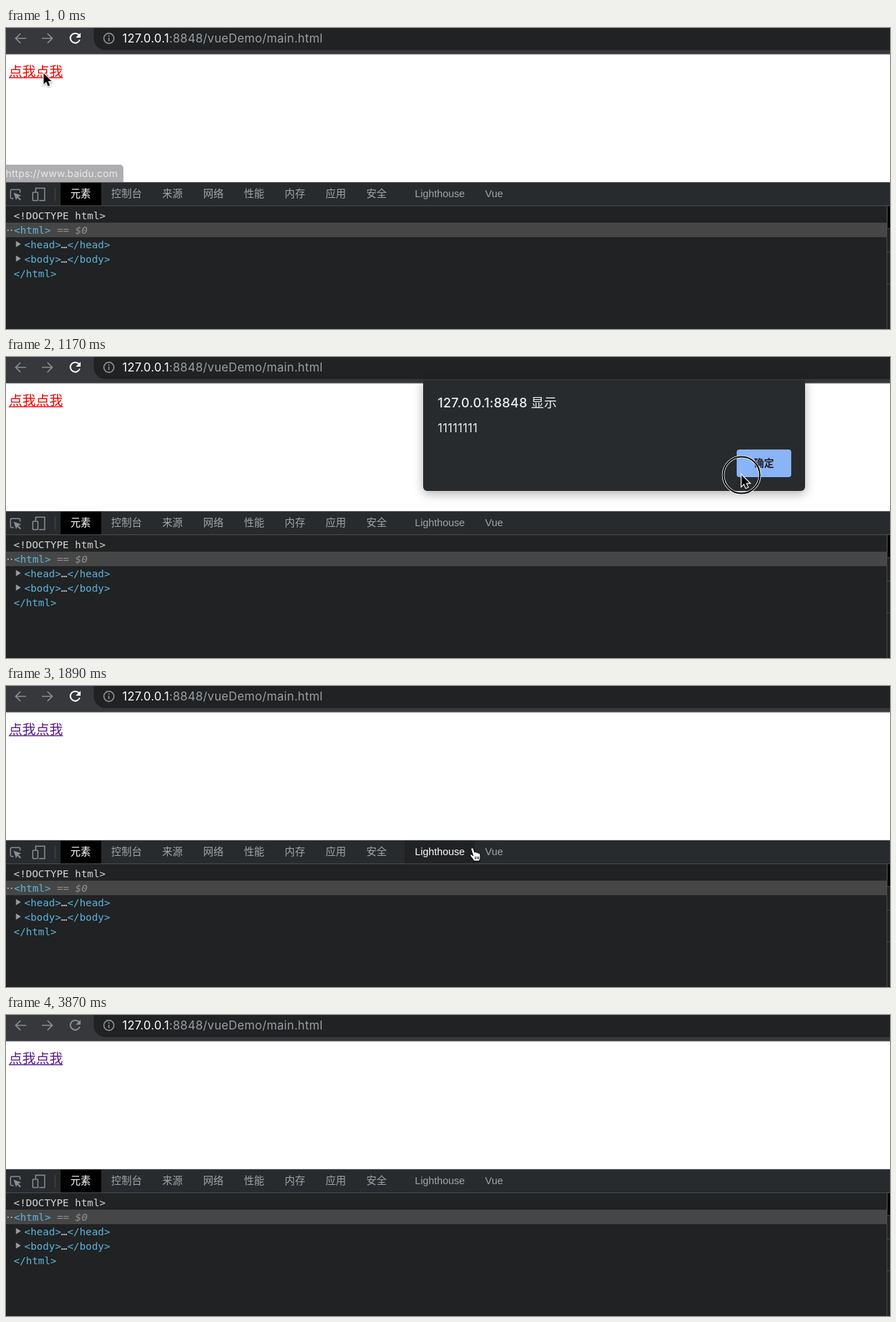
An HTML page that plays this animation: 1280x436 px, repeating every 3960 ms.

```html
<!DOCTYPE html>
<html lang="zh">
<head>
<meta charset="utf-8">
<title>Link and alert</title>
<style>
  html, body { margin: 0; width: 1280px; height: 436px; overflow: hidden; background: #fff; }
  svg { position: absolute; left: 0; top: 0; }
  text, #dialog { font-family: Inter, "Noto Sans CJK SC", "Noto Sans CJK", sans-serif; white-space: pre; }
  #tabs {
    position: absolute; left: 78.5px; top: 224px; display: flex; color: #a0a4a9;
    font: 14.8px/33px "Liberation Sans", "Noto Sans CJK SC", "Noto Sans CJK", sans-serif;
  }
  #tabs span { padding: 0 14.75px; }
  #tabs .wide { margin-left: 11px; }
  #tabs .hover { background: #202223; color: #fff; }
  #tabs .on { background: #000; color: #fff; }
  .code { font: 14.75px "DejaVu Sans Mono", monospace; fill: #5db5dd; }
  .plain { fill: #d4d5d5; }
  .dim { fill: #909090; }
  .line { fill: none; stroke: #8b8f94; stroke-width: 1.7; }
  #dialog {
    position: absolute; left: 604px; top: 34px; width: 553px; height: 160px;
    border-radius: 3px 3px 6px 6px; background: #282b2e; color: #eceef0; letter-spacing: .02em;
    box-shadow: 0 4px 15px rgba(0, 0, 0, .32); transform-origin: 50% 100%;
  }
  #dialog span { position: absolute; left: 21px; line-height: 24px; }
  #dialog .ok {
    left: 454px; top: 100px; width: 79px; height: 40px; line-height: 40px; border-radius: 4px;
    background: #8ab4f8; color: #202124; font-size: 14.6px; font-weight: 600; letter-spacing: 0; text-align: center;
  }
</style>
</head>
<body>
<svg width="1280" height="436" viewBox="0 0 1280 436">
  <!-- browser toolbar -->
  <rect width="1280" height="38" fill="#36383b"/>
  <path d="M1280 0H127V15a17 17 0 0 0 17 17H1280Z" fill="#202223"/>
  <rect y="37" width="1280" height="1.3" fill="#57585b"/>
  <g class="line">
    <path d="M29 15H14m7-7-7 7 7 7"/>
    <path d="M52 15H67m-7-7 7 7-7 7"/>
    <circle cx="149" cy="15" r="7.3"/>
    <path d="M149 14v5m0-8.6v2"/>
  </g>
  <g id="reload">
    <path d="M105.6 10.2A7 7 0 1 0 106.8 17" fill="none" stroke="currentColor" stroke-width="2"/>
    <path d="M108 7v7h-7Z" fill="currentColor"/>
  </g>
  <text x="168.5" y="21" font-size="17" letter-spacing=".02em" fill="#9aa0a6"><tspan fill="#fff">127.0.0.1</tspan>:8848/vueDemo/main.html</text>

  <!-- page -->
  <g id="link">
    <text x="4" y="69.5" font-size="19.6">点我点我</text>
    <rect x="4" y="71.3" width="78.5" height="1.4"/>
  </g>
  <g id="status">
    <path d="M0 198H165a5 5 0 0 1 5 5V224H0Z" fill="#36383b"/>
    <text x="-.5" y="216.3" font-size="14.4" letter-spacing=".012em" fill="#c4c7cb">https://www.baidu.com</text>
  </g>

  <!-- developer tools -->
  <rect y="224" width="1280" height="212" fill="#202223"/>
  <rect y="224" width="1280" height="33" fill="#282b2e"/>
  <path d="M0 223.5H1280" stroke="#727477"/>
  <path d="M0 257.5H1280M71 231.5v19" stroke="#4a4c50"/>
  <g class="line" style="stroke-width:1.5">
    <path d="M11 247H8.5a2 2 0 0 1-2-2V236a2 2 0 0 1 2-2H18.5a2 2 0 0 1 2 2v2.5"/>
    <path d="M43 237V232H56V250H48"/>
    <rect x="38.7" y="238" width="7.5" height="12" rx="1"/>
  </g>
  <path d="M11 238.5 22 242.5 17.8 244.2 21.8 248.2 20.3 249.7 16.3 245.7 14.6 249.5Z" fill="#8b8f94"/>
  <rect y="282" width="1275" height="21" fill="#464646"/>
  <text class="code plain" x="11" y="276.5">&lt;!DOCTYPE html&gt;</text>
  <text class="code" x="11.5" y="297.5">&lt;html&gt;<tspan class="dim"> == <tspan font-style="italic">$0</tspan></tspan></text>
  <text class="code" x="26.5" y="318.5">&lt;head&gt;<tspan class="plain">…</tspan>&lt;/head&gt;</text>
  <text class="code" x="26.5" y="339.5">&lt;body&gt;<tspan class="plain">…</tspan>&lt;/body&gt;</text>
  <text class="code" x="11" y="360.5">&lt;/html&gt;</text>
  <path d="M14.5 308.5v9l7-4.5ZM14.5 329.5v9l7-4.5Z" fill="#9a9da0"/>
  <path d="M2 292h2v2h-2ZM7 292h2v2h-2Z" fill="#a0a3a6"/>
  <rect x="1277" y="258" width="3" height="32" fill="#000"/>
  <path d="M1275.5 258V436M1276 290.5h4M1276 324.5h4M1276 370.5h4" stroke="#4a4c50"/>
</svg>

<div id="tabs"><span class="on">元素</span><span>控制台</span><span>来源</span><span>网络</span><span>性能</span><span>内存</span><span>应用</span><span>安全</span><span class="wide">Lighthouse</span><span>Vue</span></div>

<div id="dialog">
  <span style="top:20px;font-size:18.6px;font-weight:500">127.0.0.1:8848 显示</span>
  <span style="top:57px;font-size:17px">11111111</span>
  <span class="ok">确定</span>
</div>

<svg width="1280" height="436" viewBox="0 0 1280 436">
  <g id="mouse">
    <g id="ring" fill="none">
      <circle r="26.5" stroke="#fff" stroke-width="3.6"/>
      <circle r="26.5" stroke="#000" stroke-width="2"/>
    </g>
    <g style="filter:drop-shadow(0 1px 1px rgba(0,0,0,.35))">
      <path id="arrow" d="M0 0V16l3.7-3.5 2.7 6.2 2.7-1.2-2.6-6H11.5Z" stroke="#fff" stroke-width="2.4" paint-order="stroke"/>
      <g id="hand" stroke="#000" stroke-linejoin="round">
        <path d="M-2 0c1.5-1 2.8 0 3.2 1.5l1.3 4.5c1-1 2.6-.6 3 .6 1-.8 2.4-.2 2.7.9 1.2-.6 2.3.2 2.5 1.5l.3 4c0 2-1.2 3-1.4 5.500H1.5c-.6-2.5-3.5-4.7-5.3-7.5-.8-1.6 1-2.6 2.5-1.5l1.7 1.4-3-9C-3 1-2.7.4-2 0Z" fill="#fff"/>
        <path d="M3.5 12v4M6 12v4M8.3 12v4" fill="none"/>
      </g>
    </g>
  </g>
</svg>

<script>
const LOOP = 3960, TICK = 90;
const LINK_CLICK = 90, OK_CLICK = 1170, RELOADED = 3060;
const $ = id => document.getElementById(id);
const show = (el, on) => { el.style.display = on ? '' : 'none'; };

// Progress from 0 to 1 between two times
const ramp = (t, from, to) => Math.min(1, Math.max(0, (t - from) / (to - from)));

const easeIn = p => p * p;
const easeOut = p => 1 - (1 - p) ** 3;
const easeBoth = p => p * p * (3 - 2 * p);

const home = [54.5, 65.5];
const legs = [
  { from: 270, to: 720, end: [940, 160], ease: easeBoth },
  { from: 720, to: 1080, end: [1065, 171], ease: easeBoth },
  { from: 1350, to: 1890, end: [676, 235], ease: easeOut },
  { from: 1890, to: 2340, end: [600, 450], ease: easeIn }
];

function mouseAt(t) {
  let pos = home;
  for (const { from, to, end, ease } of legs) {
    const p = ease(ramp(t, from, to));
    pos = pos.map((v, i) => v + (end[i] - v) * p);
  }
  return pos;
}

const tabs = [...$('tabs').children].map(el => ({ el, box: el.getBoundingClientRect() }));

function draw(t) {
  const [x, y] = mouseAt(t);
  let over = false;
  for (const { el, box } of tabs) {
    const hit = x >= box.left && x < box.right && y >= box.top && y < box.bottom;
    el.classList.toggle('hover', hit);
    over = over || hit;
  }
  $('mouse').setAttribute('transform', `translate(${x} ${y})`);
  show($('arrow'), !over);
  show($('hand'), over);
  show($('ring'), t === LINK_CLICK || t === OK_CLICK);

  $('link').setAttribute('fill', t <= OK_CLICK ? '#ee0000' : '#551a8b');
  $('status').style.opacity = Math.min(.4 + .6 * ramp(t, 0, 180), 1 - ramp(t, 810, 1080));
  $('reload').style.color = t < RELOADED ? '#fff' : '#8b8f94';

  // The sheet leans back around its lower edge
  const opened = ramp(t, LINK_CLICK, 360);
  const shown = opened - ramp(t, OK_CLICK, 1395);
  const tilt = 1 - opened + ramp(t, OK_CLICK, 1350);
  const sheet = $('dialog');
  show(sheet, shown > 0);
  sheet.style.opacity = shown;
  sheet.style.transform = tilt
    ? `translateY(${-20 * tilt}px) matrix3d(1,0,0,0, 0,${1 + .0737 * tilt},0,${-.00042 * tilt}, 0,0,1,0, 0,0,0,1)`
    : 'none';
}

const start = performance.now();
function frame() {
  const t = (performance.now() - start) % LOOP;
  draw(Math.floor(t / TICK) * TICK);
  requestAnimationFrame(frame);
}
frame();
</script>
</body>
</html>
```
